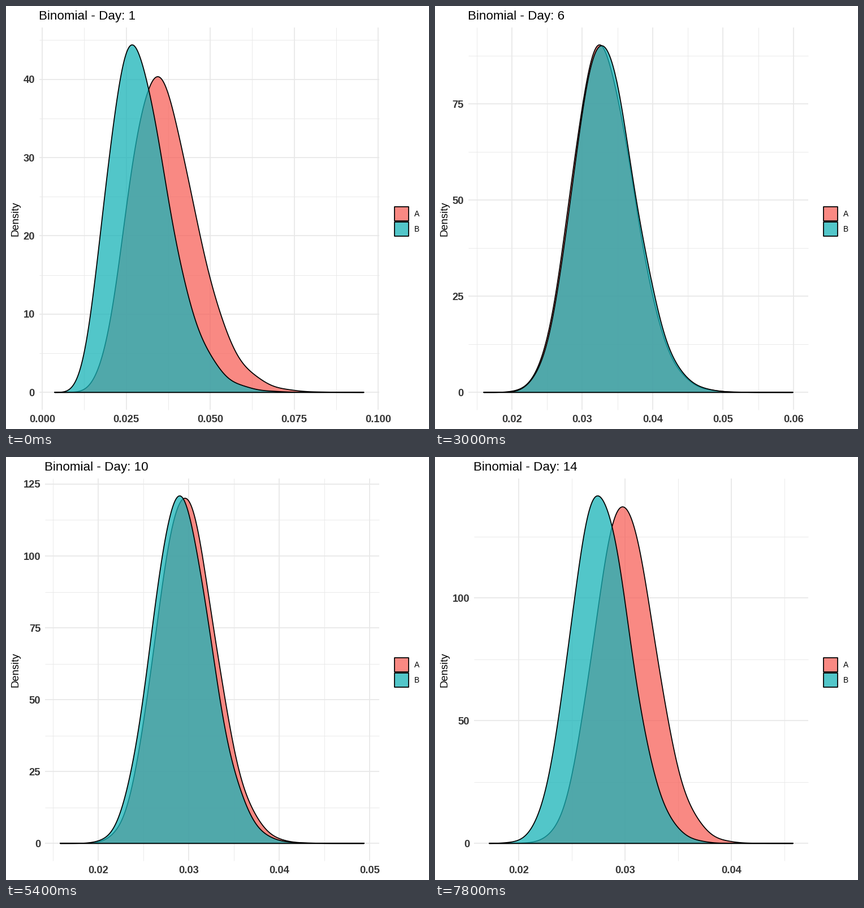
Animation of 748 by 748 pixels, one loop 8000 ms. Source, as a matplotlib script:

```python
import math

import matplotlib.pyplot as plt
import numpy as np
from matplotlib.animation import FuncAnimation

SIZE, DPI = 748, 64
PT = 72 / DPI  # points per pixel
RIGHT, TOP, BOTTOM = 660, 38, 714
RED, TEAL, ALPHA = "#f7615a", "#18b3b8", 0.75
STEPS_PER_DAY = 3

# Key points of the run; the days between follow by interpolation.
KEY_DAYS = (1, 4, 6, 8, 10, 12, 14)
MODE_A = (0.0342, 0.0349, 0.0326, 0.0288, 0.0295, 0.0292, 0.0298)
MODE_B = (0.0269, 0.0355, 0.0328, 0.0312, 0.0290, 0.0290, 0.0275)
TALLEST = (44.4, 70.5, 90.4, 108.6, 120.9, 133.6, 141.6)
X_LOW = (0.0037, 0.0155, 0.0160, 0.0158, 0.0158, 0.0183, 0.0172)
X_HIGH = (0.0957, 0.0637, 0.0599, 0.0500, 0.0494, 0.0448, 0.0458)


def on_day(day, track):
    """Interpolate over the root of time, as spread shrinks with 1/sqrt(n)."""
    return np.interp(math.sqrt(day), np.sqrt(KEY_DAYS), track)


def expand(lo, hi):
    pad = 0.05 * (hi - lo)
    return lo - pad, hi + pad


def breaks(lo, hi, wanted=5):
    """Extended Wilkinson labelling: best (start, step, count)."""
    span = hi - lo
    power = math.floor(math.log10(span))
    nice = (1, 5, 2, 2.5, 4, 3)
    best, score = None, -9
    for z in (power - 1, power):
        for rank, q in enumerate(nice):
            step = q * 10.0**z
            if span / step > 12:
                continue
            first = math.floor(lo / step)
            for n0 in range(first, first + 3):
                for count in range(2, 12):
                    a, b = n0 * step, (n0 + count - 1) * step
                    simple = -rank / 5 + (a <= 0 <= b)
                    cover = 1 - 50 * ((hi - b) ** 2 + (lo - a) ** 2) / span**2
                    ratio = (count - 1) / (b - a) * (max(b, hi) - min(a, lo)) / (wanted - 1)
                    dense = 2 - max(ratio, 1 / ratio)
                    total = 0.25 * simple + 0.2 * cover + 0.5 * dense
                    if total > score + 1e-9:
                        best, score = (a, step, count), total
    return best


def ticks(lo, hi):
    start, step, count = breaks(lo, hi)

    def inside(values):
        return [v for v in values if lo <= v <= hi]

    major = inside([start + i * step for i in range(count)])
    minor = inside([start + (i + 0.5) * step for i in range(-1, count)])
    digits = next(d for d in range(6) if abs(round(step, d) - step) < 1e-9)
    return major, minor, digits


def density(x, mode, peak, rng):
    """Gamma-shaped curve with the slight ripple of a sampled estimate."""
    shape = 1.04 * 2 * math.pi * (mode * peak) ** 2
    u = x / mode
    y = np.exp(shape * (np.log(u) + 1 - u))
    t = (u - 1) * math.sqrt(shape)
    ripple = sum(np.sin(f * t + rng.uniform(0, 2 * math.pi)) for f in (3.1, 4.7, 6.3))
    y = np.maximum(y + 0.004 * np.sqrt(y) * ripple, 0)
    return y * peak / y.max()


def label(x, y, text, size, **style):
    style = {"ha": "left", "color": "black", **style}
    ax.text(x, y, text, fontsize=size * PT, family="Liberation Sans",
            va="baseline", **style)


def outlined(xs, ys, color):
    ax.fill(xs, ys, color=color, alpha=ALPHA, lw=0)
    ax.fill(xs, ys, fill=False, ec="black", lw=1.75 * PT, joinstyle="round")


def legend():
    for name, color, y in (("A", RED, 354.8), ("B", TEAL, 381.6)):
        outlined([687, 712, 712, 687], [y, y, y + 25, y + 25], color)
        label(722, y + 17.6, name, 13.8)


def draw(i):
    ax.cla()
    ax.set(xlim=(0, SIZE), ylim=(SIZE, 0))
    ax.set_axis_off()

    day = i // STEPS_PER_DAY + 1
    x_lo, x_hi, top = (on_day(day, t) for t in (X_LOW, X_HIGH, TALLEST))
    modes = [on_day(day, t) for t in (MODE_A, MODE_B)]
    x0, x1 = expand(x_lo, x_hi)
    y0, y1 = expand(0, top)
    x_major, x_minor, x_digits = ticks(x0, x1)
    y_major, y_minor, y_digits = ticks(y0, y1)
    left = 69 if max(y_major) >= 99.5 else 58.7

    def px(x):
        return left + (x - x0) / (x1 - x0) * (RIGHT - left)

    def py(y):
        return BOTTOM - (y - y0) / (y1 - y0) * (BOTTOM - TOP)

    for xs, ys, width in ((x_minor, y_minor, 0.9), (x_major, y_major, 1.75)):
        style = {"color": "#e8e8e8", "lw": width * PT, "zorder": 0}
        ax.vlines([px(x) for x in xs], TOP, BOTTOM, **style)
        ax.hlines([py(y) for y in ys], left, RIGHT, **style)

    x = np.linspace(x_lo, x_hi, 512)
    edge = np.concatenate(([x_lo], x, [x_hi]))
    rng = np.random.default_rng(day)
    for mode, color in zip(modes, (RED, TEAL)):
        peak = top * (min(modes) / mode) ** 0.4  # a lower rate is less spread
        y = np.concatenate(([0], density(x, mode, peak, rng), [0]))
        outlined(px(edge), py(y), color)

    tick = {"weight": "bold", "color": "#333333"}
    for v in x_major:
        label(px(v), 736, f"{v:.{x_digits}f}", 18.4, ha="center", **tick)
    for v in y_major:
        label(left - 7.7, py(v) + 6.6, f"{v:.{y_digits}f}", 18.4, ha="right", **tick)
    label(left - 0.5, 24.3, f"Binomial - Day: {day}", 22.4)
    label(21.5, 376, "Density", 18.5, ha="center", rotation=90,
          rotation_mode="anchor")
    legend()
    return []


fig = plt.figure(figsize=(SIZE / DPI, SIZE / DPI), dpi=DPI, facecolor="white")
ax = fig.add_axes((0, 0, 1, 1))
anim = FuncAnimation(fig, draw, frames=40, interval=200, init_func=lambda: [],
                     repeat=True, repeat_delay=0)
plt.show()
```
